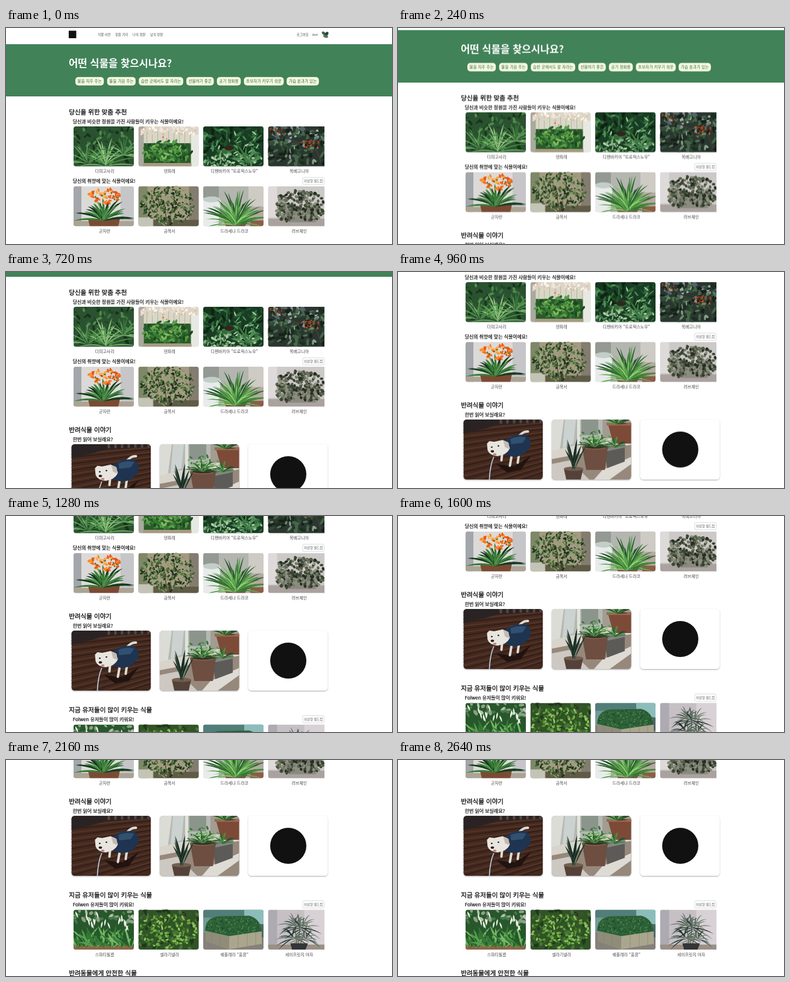
Recreate the animation shown at these times as an HTML page. Size 640x360 px, loop 3.2 s.

```html
<!DOCTYPE html>
<html lang="ko">
<head>
<meta charset="utf-8">
<title>식물 추천</title>
<style>
html, body { margin: 0; width: 100%; height: 100%; overflow: hidden; background: #fff; }
svg { display: block; }
text { font-family: "Noto Sans CJK KR", "Noto Sans CJK", "Noto Sans", sans-serif; }
#page { animation: scroll 3200ms infinite; }
@keyframes scroll {
  0%, 2.5% { transform: translateY(0); animation-timing-function: steps(4); }
  12.5% { transform: translateY(-47px); animation-timing-function: steps(4); }
  22.5% { transform: translateY(-106px); animation-timing-function: steps(7); }
  40% { transform: translateY(-202px); animation-timing-function: steps(4); }
  50% { transform: translateY(-238px); animation-timing-function: steps(4); }
  60%, 100% { transform: translateY(-300px); }
}
</style>
</head>
<body>
<svg width="640" height="360" viewBox="0 0 640 360">
  <defs>
    <clipPath id="thumb"><rect width="100" height="66.5" rx="4"/></clipPath>
    <clipPath id="story"><rect width="131.5" height="100" rx="5.5"/></clipPath>
    <clipPath id="column"><rect x="104" width="424" height="720"/></clipPath>
    <filter id="shadow" x="-10%" y="-10%" width="120%" height="125%">
      <feDropShadow dx="0" dy="1" stdDeviation="1" flood-opacity=".35"/>
    </filter>
  </defs>
  <g id="page"></g>
</svg>
<script>
let seed = 7;
const rnd = () => (seed = seed * 16807 % 2147483647) / 2147483647;
const vary = (v, d) => v + (rnd() - .5) * 2 * d;
const pick = list => list[Math.floor(rnd() * list.length)];
const fix = v => v.toFixed(1);
const many = (n, make) => Array.from({ length: n }, (_, i) => make(i)).join('');

// Text is set at triple size and scaled down; y is the middle of the line.
// A thin outline of the same colour gives the medium weight.
const text = (str, x, y, size, { fill = '#111', weight = 400, anchor = 'start', edge = 0 } = {}) =>
  `<text transform="translate(${x} ${y + size * .37}) scale(${1 / 3})" font-size="${size * 3}" fill="${fill}" ` +
  `stroke="${fill}" stroke-width="${edge}" font-weight="${weight}" text-anchor="${anchor}">${str}</text>`;

const rect = (x, y, w, h, fill, rx = 0) =>
  `<rect x="${x}" y="${y}" width="${w}" height="${h}" rx="${rx}" fill="${fill}"/>`;
const oval = (x, y, rx, ry, fill, turn = 0) =>
  `<ellipse transform="translate(${fix(x)} ${fix(y)}) rotate(${fix(turn)})" rx="${fix(rx)}" ry="${fix(ry)}" fill="${fill}"/>`;
const shape = (d, fill) => `<path d="${d}" fill="${fill}"/>`;
const line = (d, color, w) => `<path d="${d}" fill="none" stroke="${color}" stroke-width="${w}" stroke-linecap="round"/>`;

function blade(x, y, a, len, w, fill, sag) {
  const sx = Math.sin(a), cy = Math.cos(a);
  const mx = x + sx * len * .5, my = y - cy * len * .62;
  const nx = cy * w, ny = sx * w;
  return shape(`M${fix(x)} ${fix(y)}Q${fix(mx - nx)} ${fix(my - ny)} ${fix(x + sx * len)} ${fix(y - cy * len + sag)}` +
    `Q${fix(mx + nx)} ${fix(my + ny)} ${fix(x)} ${fix(y)}`, fill);
}
const fan = (n, x, y, spread, len, w, colors, sag = 0) => many(n, i =>
  blade(vary(x, 3), y, vary((i / (n - 1) * 2 - 1) * spread, .12), len * (.65 + rnd() * .35), w, pick(colors), sag));
const leaves = (n, x, y, w, h, r, colors, flat = .5) => many(n, () =>
  oval(x + rnd() * w, y + rnd() * h, vary(r, r * .3), vary(r * flat, r * .15), pick(colors), rnd() * 180));
// Leaves packed inside an oval outline.
const bush = (n, x, y, rx, ry, r, colors, flat = .6) => many(n, () => {
  const a = rnd() * 6.283, d = Math.sqrt(rnd());
  return oval(x + Math.cos(a) * d * rx, y + Math.sin(a) * d * ry, r, r * flat, pick(colors), rnd() * 180);
});

const GREEN = ['#275f2b', '#3a7d38', '#549a4c', '#1c4722'];
const LIGHT = ['#4d9a3c', '#72b85a', '#3b842f', '#8cc777'];
const DARK = ['#16351c', '#23502a', '#356b3a', '#0f2413'];
const HEART = ['#3a4634', '#566049', '#262e24', '#74796a', '#8d917c'];
const back = fill => rect(0, 0, 140, 100, fill);

const photos = {
  fern: () => back('#2b5230') + leaves(70, 0, 0, 100, 66, 4, ['#1f4426', '#3b6f3c', '#4f8a4c', '#173319']) +
    fan(13, 22, 62, 1.3, 50, 2, ['#5c9a55', '#84b976', '#3e7f3f'], 8) +
    fan(17, 54, 66, 1.3, 60, 2.2, ['#6aa95d', '#97c786', '#458a42'], 9) +
    fan(13, 82, 48, 1.6, 46, 2, ['#559850', '#86b878', '#3a7a3c'], 10),
  orchid: () => back('#d9d6c8') + rect(0, 0, 9, 67, '#a9aa9d') + rect(88, 14, 12, 53, '#e6e9e2') +
    rect(9, 28, 78, 34, '#2b5a2b') + many(9, i => line(`M${14 + i * 9} 30V8`, '#9cae7c', .7)) +
    leaves(80, 2, 0, 94, 14, 2.1, ['#f4e7dc', '#ecd0c8', '#fff6ec', '#d7c0a4'], .7) +
    bush(75, 48, 43, 40, 19, 4.5, GREEN, .45) +
    leaves(45, 12, 30, 70, 26, 3.6, ['#5f9f43', '#82bb60', '#357a2e'], .4) +
    rect(8, 61, 80, 6, '#a49b80') + oval(41, 18, 1.6, 1.2, '#ed6531') + oval(47, 21, 1.2, 1, '#ed6531'),
  dieffen: () => back('#183c24') + leaves(60, 0, 0, 100, 55, 7, DARK, .35) +
    leaves(45, 0, 2, 100, 40, 5.5, ['#326e3d', '#4f9055', '#214f2d'], .3) +
    leaves(18, 20, 4, 75, 40, 4.2, ['#9dc79b', '#6ea875'], .22) + oval(43, 36, 8, 4, '#33251c') +
    leaves(80, 0, 46, 96, 21, 3.6, ['#85b482', '#b1d1a2', '#528c56', '#386f40'], .45) +
    fan(7, 72, 60, 1.3, 34, 3.2, ['#3c7b43', '#548f57', '#275a31'], 3),
  begonia: () => back('#2a3730') + leaves(24, 0, 0, 100, 30, 6, ['#82928f', '#536467', '#a4b0ae'], .4) +
    leaves(95, 0, 4, 100, 62, 5, ['#1c2c20', '#304d35', '#456648', '#172118'], .45) +
    leaves(22, 2, 18, 92, 44, 4, ['#6b8a68', '#527455', '#8aa08e'], .35) + line('M8 0Q40 30 60 28T88 62', '#58483c', 1) +
    leaves(12, 3, 3, 22, 10, 1.4, ['#e84c22', '#c23d22']) + leaves(25, 52, 17, 32, 24, 1.6, ['#ef5127', '#cc3c22']),
  clivia: () => back('#dcdad8') + rect(0, 0, 13, 67, '#a3a6aa') + rect(78, 0, 22, 67, '#c6c6c8') +
    rect(0, 58, 100, 9, '#aca394') + shape('M24 54H77L74 67H27Z', '#7a4b33') +
    fan(19, 50, 58, 1.35, 56, 3.2, ['#153d1d', '#27632d', '#377c37', '#102d17'], 10) +
    fan(9, 50, 58, 1, 46, 2.6, ['#1c4a22', '#3b7f3a', '#5a9650'], 6) +
    bush(48, 51, 16, 26, 13, 3.3, ['#f36b19', '#ff8a27', '#e95214', '#ffab4b'], .5) +
    bush(9, 54, 18, 20, 9, 1.8, ['#31602c'], .5),
  osmanthus: () => back('#a39a82') + rect(0, 0, 15, 67, '#7e8868') + rect(84, 0, 16, 67, '#857c70') +
    rect(0, 52, 24, 15, '#c4c4b6') + rect(25, 56, 75, 11, '#5f5b46') +
    line('M48 66L42 24M50 66L60 20', '#4d4029', 1.2) +
    bush(150, 49, 31, 44, 34, 3, ['#2b4725', '#3d6231', '#1b2f1a', '#4d7039'], .5) +
    bush(170, 49, 32, 42, 33, 1.8, ['#5b7e46', '#7d9a5c', '#223a1f', '#a3b084'], .5),
  dracaena: () => back('#b3b5ae') + rect(0, 0, 26, 36, '#949a93') + rect(75, 0, 25, 40, '#cdcbc4') +
    shape('M0 20Q17 14 29 24L25 67H0Z', '#e8ebea') + oval(14, 22, 14, 5, '#c2cec8') +
    shape('M73 34H100V67H62Z', '#b5aaa1') + rect(78, 57, 22, 10, '#8d5d49') +
    shape('M34 58H74L69 67H38Z', '#755442') +
    fan(30, 54, 64, 1.2, 70, 2.1, GREEN, 9) +
    fan(32, 54, 65, 1.35, 62, 1.8, LIGHT, 11) + fan(14, 54, 66, 1.2, 42, 1.7, ['#2d7030', '#61ac4c', '#9dd884'], 10),
  hearts: () => back('#cdc9c8') + rect(0, 0, 15, 52, '#dedad9') + rect(0, 54, 100, 13, '#aaa29f') +
    shape('M22 35H84L79 60H28Z', '#8b8a80') +
    bush(150, 53, 25, 40, 18, 2.8, HEART, .75) + bush(70, 30, 44, 18, 14, 2.6, HEART, .75) +
    bush(90, 70, 42, 22, 15, 2.6, HEART, .75),
  lily: () => back('#28572b') + rect(0, 60, 100, 7, '#8b6546') + leaves(34, 0, 0, 100, 22, 4.5, ['#8aa183', '#467848', '#b3c4ac']) +
    many(7, i => fan(9, 6 + i * 15, 64, .95, 46, 3.2, ['#377a37', '#56a04d', '#225a2a', '#79b966'], 5)) +
    many(18, () => blade(6 + rnd() * 86, 13 + rnd() * 26, vary(0, .5), 12, 2.5, '#f0f6e9', 0)) +
    leaves(14, 2, 59, 95, 6, 1.1, ['#dc7045', '#b75c39']),
  selaginella: () => back('#315326') + leaves(70, 0, 0, 100, 66, 4.5, ['#1f381b', '#34592a', '#48743a']) +
    bush(190, 49, 36, 48, 29, 2.9, ['#609b38', '#79b44c', '#3e762b', '#91c462', '#294f20'], .55) +
    leaves(7, 15, 5, 75, 17, 1.1, ['#df5b3a']),
  hedge: () => back('#729a95') + rect(0, 0, 100, 13, '#527e79') + rect(68, 0, 32, 27, '#8dbdbb') +
    rect(0, 38, 100, 29, '#85817a') + rect(86, 24, 14, 22, '#4e6869') +
    shape('M4 35L43 43L97 36V57L43 66L4 52Z', '#aaa58d') + shape('M4 35L43 43V66L4 52Z', '#8f8d79') +
    line('M14 39V55M28 42V60M58 42V63M73 40V60M87 38V58', '#777969', .5) +
    shape('M3 35Q4 12 27 11L76 10Q94 14 97 36L43 44Z', '#2b5f37') +
    bush(190, 50, 26, 46, 14, 1.8, ['#2b5a35', '#39713c', '#4c864b', '#1d4a2a'], .5),
  palm: () => back('#c6c0c5') + rect(60, 0, 40, 67, '#d8d1d6') + rect(0, 0, 15, 67, '#aeaab2') +
    rect(0, 58, 100, 9, '#9b9086') + line('M48 62L44 20M50 62L54 14M52 62L65 24', '#5a6048', 1.3) +
    fan(15, 44, 26, 1.8, 32, 1.6, ['#293a34', '#4b5e52', '#65756c'], 8) +
    fan(19, 55, 32, 1.9, 40, 1.6, ['#263630', '#42594a', '#697a6b'], 11) +
    fan(15, 42, 48, 1.8, 34, 1.6, ['#22342b', '#40564a', '#596c58'], 10) +
    fan(13, 62, 50, 1.7, 32, 1.6, ['#22342b', '#40564a', '#6d7c68'], 10) + shape('M37 56H66L62 67H40Z', '#333537'),
  dog: () => back('#43291f') + many(13, i => line(`M0 ${i * 11}L132 ${i * 8 - 8}`, '#24150f', .9)) +
    many(12, i => line(`M0 ${6 + i * 11}L132 ${i * 8 - 3}`, '#5a392a', 1.4)) +
    shape('M0 0H132V5L58 9L0 24Z', '#2a2324') + many(7, i => rect(60 + i * 11, 0, 4, 7 - i * .3, '#574740')) +
    shape('M54 74L85 78L112 60L95 84L72 88Z', '#21130f') +
    line('M92 28Q99 19 107 20', '#dedbd4', 4) + line('M64 58L63 68M80 60L77 77M92 58L90 72', '#dedbd4', 4) +
    shape('M68 35Q82 24 102 25Q115 32 110 47Q99 63 83 62Q66 60 62 50Z', '#1f3450') +
    shape('M78 32Q92 26 104 30L98 39L79 41Z', '#32506f') +
    shape('M39 40L43 36L51 37L65 34L74 38L77 48Q72 59 57 61Q43 60 40 51Z', '#e8e5df') +
    shape('M66 35L75 39L76 49L69 46Z', '#c4bab0') + oval(47, 46, 1.4, 1.2, '#211e1d') +
    oval(58, 44, 1.4, 1.2, '#211e1d') + oval(48, 53, 2.8, 1.9, '#211e1d') + oval(52, 58, 2.8, 1.4, '#ba746e') +
    line('M50 63Q44 77 43 100', '#b7c7d8', 1.8),
  balcony: () => back('#a39c92') + rect(0, 0, 84, 55, '#b4b9b3') + shape('M0 0H20L10 76H0Z', '#dcdcd6') +
    shape('M22 0H40L36 40L18 48Z', '#ccd2d0') + rect(42, 0, 5, 47, '#e2e3dd') + rect(49, 0, 28, 26, '#8b958c') +
    shape('M0 52L83 32L132 28V42L0 66Z', '#d8d4cb') +
    shape('M0 66L132 42V100H0Z', '#97887c') + shape('M0 74L30 68L62 100H0Z', '#cdc9c2') +
    shape('M84 84L132 62V74L96 100H70Z', '#dedbd5') +
    shape('M93 7H132V40H102Z', '#7d4a38') + rect(91, 5, 41, 5, '#9c6650') +
    fan(15, 109, 8, 1.3, 28, 2, GREEN, 4) + shape('M86 46L121 40V70L92 81Z', '#5c5b57') +
    shape('M86 46L121 40L124 46L91 53Z', '#868680') + fan(15, 104, 47, 1.2, 28, 1.7, GREEN, 5) +
    shape('M50 45H93L88 84H57Z', '#6d4e40') + oval(71.5, 45, 21.5, 5, '#8a6753') + oval(71.5, 45, 18, 3.4, '#392b22') +
    fan(25, 71, 46, 1.4, 34, 2, ['#36753a', '#62a254', '#87bd77', '#254f2a'], 8) +
    leaves(36, 48, 20, 48, 22, 2.8, ['#4d8f42', '#7bb069', '#336f30'], .4) +
    shape('M20 82H52L48 100H24Z', '#54423a') + oval(36, 82, 16, 3.6, '#75604f') +
    fan(12, 36, 84, .4, 54, 2.6, ['#263f31', '#3e5b43', '#172a21'])
};

const photo = (name, x, y, clip = 'thumb') =>
  `<g transform="translate(${x} ${y})" clip-path="url(#${clip})">${photos[name]()}</g>`;
const row = (y, items) => `<g clip-path="url(#column)">` + items.map(([name, label], i) =>
  photo(name, 112 + i * 107.5, y) +
  text(label, 163.7 + i * 107.5, y + 74.7, 6.9, { fill: '#484848', anchor: 'middle' })).join('') + '</g>';
const heading = (str, y) => text(str, 104.2, y, 10.55, { edge: .9 });
const sub = (str, y) => text(str, 110.7, y, 7.93, { edge: .7 });
const button = y => `<rect x="492" y="${y - 6}" width="35.3" height="12" rx="2" fill="#fff" stroke="#c3cdc8" stroke-width=".7"/>` +
  text('이상형 월드컵', 509.7, y, 5.33, { fill: '#555', anchor: 'middle' });
const chip = ([str, x, w]) => rect(x, 81.7, w, 14, '#f7fadf', 5) +
  text(str, x + w / 2, 88.7, 6.67, { fill: '#2f6b46', anchor: 'middle' });
const storyCard = x => `<rect x="${x}" y="393" width="131.5" height="100" rx="5.5" fill="#fff" filter="url(#shadow)"/>`;

const header = rect(104, 4.5, 12.5, 12.5, '#111') +
  ['식물 사전', '읽을 거리', '나의 정원', '남의 정원'].map((s, i) => text(s, 152.3 + i * 28.9, 11.3, 5.33, { fill: '#444' })).join('') +
  text('로그아웃', 482, 11.3, 5.33, { fill: '#444' }) + text('duri', 507.5, 11.3, 5.33, { fill: '#444' }) +
  oval(527, 9, 3.8, 2.3, '#3f6149', 40) + oval(531.5, 10, 4, 2.5, '#24452d', -55) + oval(530, 14, 4.2, 2.2, '#58755c', 15);

const chips = [['물을 자주 주는', 115, 47.2], ['물을 가끔 주는', 167.7, 47.2], ['습한 곳에서도 잘 자라는', 220.3, 73.5],
  ['선물하기 좋은', 299, 45.5], ['공기 정화용', 349.7, 39.6], ['초보자가 키우기 쉬운', 394.5, 66], ['가습 효과가 있는', 465.3, 53.5]];

document.getElementById('page').innerHTML = header +
  rect(0, 27, 640, 87, '#418259') +
  text('어떤 식물을 찾으시나요?', 104, 59.3, 16.67, { fill: '#fff', weight: 700 }) +
  chips.map(chip).join('') +
  heading('당신을 위한 맞춤 추천', 140) +
  sub('당신과 비슷한 정원을 가진 사람들이 키우는 식물이에요!', 155.7) +
  row(164, [['fern', '더피고사리'], ['orchid', '덴파레'], ['dieffen', '디펜바키아 "트로픽스노우"'], ['begonia', '목베고니아']]) +
  sub('당신의 취향에 맞는 식물이에요!', 255.3) + button(255) +
  row(263.7, [['clivia', '군자란'], ['osmanthus', '금목서'], ['dracaena', '드라세나 드라코'], ['hearts', '러브체인']]) +
  heading('반려식물 이야기', 369) +
  sub('한번 읽어 보실래요?', 384.7) +
  [108.5, 255, 401.7].map(storyCard).join('') +
  photo('dog', 108.5, 393, 'story') + photo('balcony', 255, 393, 'story') +
  oval(468, 443, 30, 30, '#111') +
  heading('지금 유저들이 많이 키우는 식물', 525.5) +
  sub('Folwen 유저들이 많이 키워요!', 541) + button(540.7) +
  row(549.6, [['lily', '스파티필름'], ['selaginella', '셀라기넬라'], ['hedge', '쉐플레라 "홍콩"'], ['palm', '세이프릿지 야자']]) +
  heading('반려동물에게 안전한 식물', 655);
</script>
</body>
</html>
```
